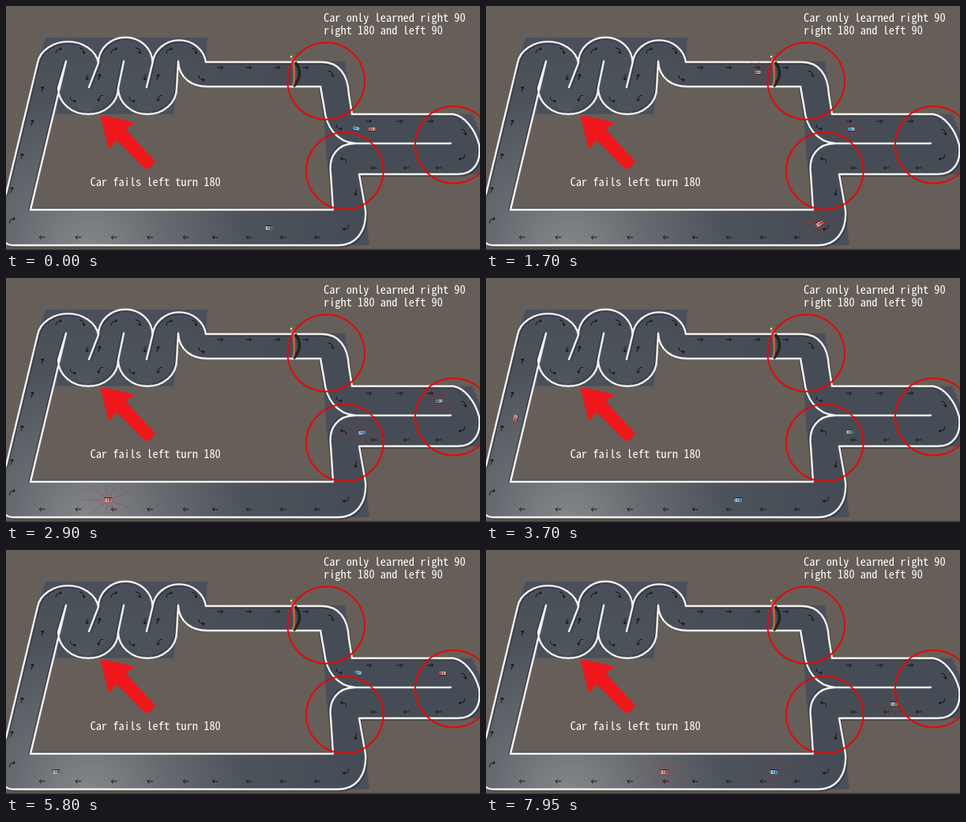
An HTML page that plays this animation: 600x309 px, repeating every 8 s.

```html
<!DOCTYPE html>
<html lang="en">
<head>
<meta charset="utf-8">
<title>Track training</title>
<style>
html, body { margin: 0; width: 100%; height: 100%; overflow: hidden; background: #665e58; }
svg { display: block; width: 100%; height: 100%; }
text { font: 12px "Noto Sans Mono CJK SC", "Noto Sans Mono", "DejaVu Sans Mono", monospace; fill: #fff; }
.wall { fill: none; stroke: #f2f3f4; stroke-width: 2.4; stroke-linejoin: round; stroke-linecap: round; }
.shade { fill: none; stroke: #272c33; stroke-width: 2.6; opacity: .45; }
.mark { fill: none; stroke: #0b0c0e; stroke-width: 1; }
.ring { fill: none; stroke: #e80606; stroke-width: 2; }
.rays { fill: none; stroke: #d3262b; stroke-width: .7; opacity: .6; }
</style>
</head>
<body>
<svg viewBox="0 0 600 309">
  <defs>
    <radialGradient id="sheen" gradientUnits="userSpaceOnUse" cx="105" cy="310" r="330">
      <stop offset="0" stop-color="#85878a"/>
      <stop offset=".3" stop-color="#666a70"/>
      <stop offset=".6" stop-color="#4d535b"/>
      <stop offset="1" stop-color="#464c55"/>
    </radialGradient>
    <path id="outer" d="M0 238L40 72A39 32 0 0 1 117 72L105 103L117 72A34 32 0 0 1 185.5 72L178 103L185.5 72A34 32 0 0 1 253 71H400C422 71 433 88 434 112L438 137H566C580 139 594 156 599 176C602 200 590 213 572 213H447L455 258C457 284 444 303 420 303H10Q3 303 0 300"/>
    <path id="inner" d="M76 70L31 258H414L411 212C408 190 420 174 442 174H563H442C418 172 405 152 403 130L398 102H255C236 102 219 92 218 70L216 104A37 33 0 0 1 142 104L149 70L142 104A38 33 0 0 1 66 104Z"/>
    <path id="straight" d="M-4 0H4M1.2-2.6L4 0L1.2 2.6"/>
    <path id="bend" d="M-4 3.5Q-5-3 3.5-3M1-5.2L3.8-3L1-.8"/>
    <path id="lap" d="M336 84H385Q414 84 416 113Q420 156 452 156H548Q583 156 583 176Q583 195 556 195H455Q432 196 432 220L433 250Q434 281 400 281H45Q16 283 17 262L63 72Q68 54 81 54Q95 54 95 72L86 104Q84 118 100 119Q112 119 117 108"/>
  </defs>
  <rect width="600" height="309" fill="#665e58"/>
  <rect y="307.5" width="600" height="1.5" fill="#443f3b"/>
  <path fill="#4a505a" d="M50 40H255L253 75H40ZM398 70H429L438 140H398ZM560 137H590L600 160V213H560ZM415 303H460L454 250H415Z"/>
  <use href="#outer" fill="url(#sheen)"/>
  <use href="#inner" fill="#665e58"/>
  <path fill="#4a505a" d="M66 104L64 137H212L216 104L178 136L142 104L100 136ZM402 125L404 172L408 213L414 190L442 174L414 160Z"/>
  <use href="#outer" class="shade" transform="translate(1.5 2)"/>
  <use href="#inner" class="shade" transform="translate(-1.5 -1)"/>
  <use href="#outer" class="wall"/>
  <use href="#inner" class="wall"/>
  <g id="marks" class="mark"></g>
  <g id="cars"></g>
  <path d="M366 71Q378 86 364 102" fill="none" stroke="#202327" stroke-width="3.5"/>
  <path d="M362 65Q367 84 363.5 101" fill="none" stroke="#c4693a" stroke-width="2.6"/>
  <circle cx="361" cy="64" r="1.2" fill="#eee"/>
  <path fill="#f0171c" d="M119 138L162 147L152 157L189 197L178 208L140 170L130 181Z"/>
  <circle class="ring" cx="405.2" cy="95" r="48.8"/>
  <circle class="ring" cx="428.8" cy="208.8" r="48.8"/>
  <circle class="ring" cx="566.7" cy="175.7" r="48.8"/>
  <text x="402" y="20">Car only learned right 90</text>
  <text x="402" y="36">right 180 and left 90</text>
  <text x="106.5" y="228">Car fails left turn 180</text>
</svg>
<script>
const LOOP = 8000, STEP = 50, LETTER_WIDTH = 7.2;
const add = (parent, tag, attrs) => {
  const el = document.createElementNS('http://www.w3.org/2000/svg', tag);
  for (const name in attrs) el.setAttribute(name, attrs[name]);
  return parent.appendChild(el);
};

// Choose the font size that gives the wanted letter pitch
for (const label of document.querySelectorAll('text')) {
  const pitch = label.getComputedTextLength() / label.textContent.length;
  label.style.fontSize = `${12 * LETTER_WIDTH / pitch}px`;
}

const marks = document.getElementById('marks');
function mark(shape, angle, x, y, count = 1, dx = 0, dy = 0, flip = 1) {
  for (let i = 0; i < count; i++) {
    add(marks, 'use', { href: '#' + shape, transform:
      `translate(${x + i * dx} ${y + i * dy}) rotate(${angle}) scale(${.9 * flip} .9)` });
  }
}
mark('straight', 180, 46, 293, 5, 45.5);
mark('straight', 180, 265, 293, 4, 43);
mark('straight', 180, 466, 205, 3, 41);
mark('straight', 0, 271, 78, 4, 36);
mark('straight', 0, 459, 146, 3, 39);
mark('straight', -76, 7, 233, 4, 13, -42.5);
mark('straight', -76, 118, 90, 2, 74);
mark('straight', 100, 103, 90, 2, 73);
mark('straight', 100, 443, 236);
mark('bend', 0, 67, 57, 3, 70);
mark('bend', 90, 96, 57, 3, 71);
mark('bend', 180, 85, 118, 2, 75, 0, -1);
mark('bend', -90, 120, 117, 2, 75, 0, -1);
mark('bend', 180, 248, 91, 1, 0, 0, -1);
mark('bend', 90, 411, 86);
mark('bend', 180, 422, 153, 1, 0, 0, -1);
mark('bend', 90, 579, 160);
mark('bend', 180, 577, 191);
mark('bend', 0, 427, 196, 1, 0, 0, -1);
mark('bend', 180, 430, 280);
mark('bend', 0, 8, 272);

// Every car drives the lap at its own steady speed and restarts at the gate
const cars = [
  { tint: '#3f6f62', body: '#e4e6e2', speed: .201, starts: [-3124, 1500, 6076] },
  { tint: '#1f86cf', body: '#d9ecf5', speed: .222, starts: [-680, 773, 5271] },
  { tint: '#d63a2c', body: '#f3e4df', speed: .238, starts: [-719, 4868] }
];

let rayPath = '';
for (let i = 0; i < 9; i++) {
  const angle = i * Math.PI / 4.5, sin = Math.sin(angle);
  const reach = Math.min(32, 18 / Math.abs(sin));
  rayPath += `M0 0L${reach * Math.cos(angle)} ${reach * sin}`;
}

for (const car of cars) {
  car.el = add(document.getElementById('cars'), 'g', {});
  car.rays = add(car.el, 'path', { d: rayPath, class: 'rays' });
  const box = (x, y, width, height, fill) => add(car.el, 'rect', { x, y, width, height, fill, rx: .8 });
  box(-5, -1.6, 10, 4.6, '#1b1d20');
  box(-4.7, -2.3, 9.4, 4.4, car.body);
  box(-4.5, -2, 4, 3.8, car.tint);
  box(.2, -1.6, 1.5, 3, '#2b3036');
  box(3, -2, 1.5, 3.8, car.tint);
}

const lap = document.getElementById('lap'), lapLength = lap.getTotalLength();

// The simulation runs slower near the ends of the loop
const simTime = t => t - 165 * Math.sin(2 * Math.PI * t / LOOP);

function place(car, time) {
  const start = car.starts.filter(t => t <= time).pop();
  const s = Math.min((time - start) * car.speed, lapLength);
  const { x, y } = lap.getPointAtLength(s);
  const a = lap.getPointAtLength(Math.max(s - 3, 0));
  const b = lap.getPointAtLength(Math.min(s + 3, lapLength));
  const turn = Math.atan2(b.y - a.y, b.x - a.x) * 180 / Math.PI;
  car.el.setAttribute('transform',
    `translate(${x} ${y}) rotate(${turn}) scale(${.72 + y / 1000})`);
}

const origin = performance.now();
function draw(now) {
  const tick = Math.floor((Math.max(now - origin, 0) % LOOP) / STEP);
  const sensing = tick % 6 >= 3;
  for (const car of cars) {
    place(car, simTime(tick * STEP));
    car.rays.style.display = sensing ? '' : 'none';
  }
  requestAnimationFrame(draw);
}
draw(origin);
</script>
</body>
</html>
```
